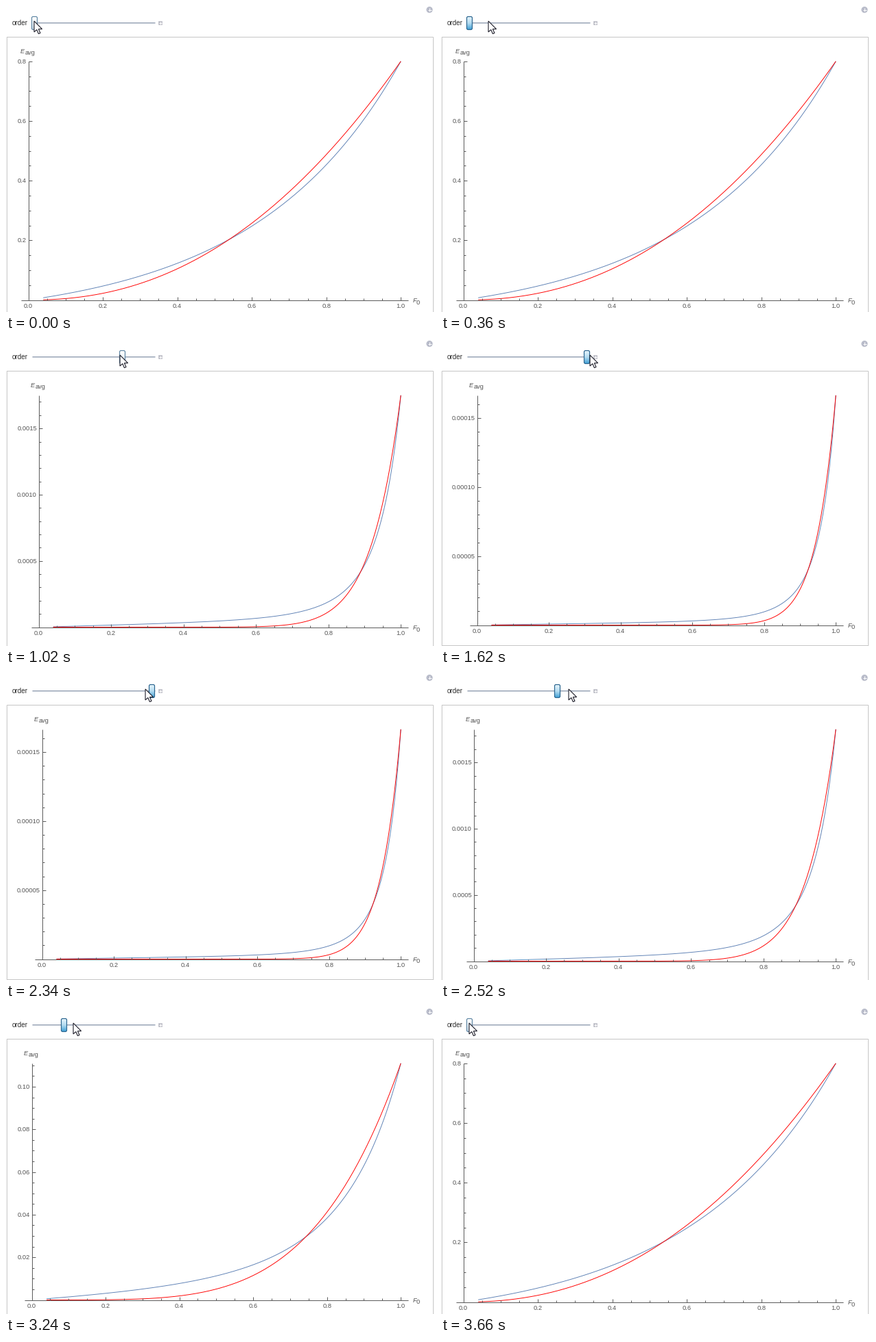
A matplotlib script for the animation above (3.84 s loop, 625 by 447 pixels).

```python
import math

import numpy as np
import matplotlib.pyplot as plt
from matplotlib.animation import FuncAnimation
from matplotlib.colors import to_rgb
from matplotlib.patches import Circle, FancyBboxPatch, Polygon, Rectangle

W, H, DPI = 625, 447, 64
FRAMES, STEP = 64, 60
PX = 72 / DPI  # points per pixel
RED, BLUE, AXIS, TEXT = "#ff0000", "#5e81b5", "#5c5c5c", "#555555"
RIGHT, TOP = 575.2, 80.8
PEAKS = [0.8, 0.111, 0.01505, 0.00175, 0.0001665]

plt.rcParams["font.family"] = "Liberation Sans"
fig = plt.figure(figsize=(W / DPI, H / DPI), dpi=DPI, facecolor="white")
ax = fig.add_axes([0, 0, 1, 1])
ax.axis("off")


def line(xs, ys, color=AXIS, width=1.0, z=3):
    return ax.plot(xs, ys, color=color, lw=width * PX, zorder=z,
                   solid_capstyle="butt")[0]


def label(x, y, s, ha="left", size=9.3, color=TEXT, **kw):
    return ax.text(x, y, s, ha=ha, va="baseline", fontsize=size * PX,
                   color=color, **kw)


def tick_step(peak):
    """Round 1-2-5 step, its minor divisions and its decimals."""
    rough = peak / 7.8
    power = math.floor(math.log10(rough))
    lead = next(m for m in (1, 2, 5, 10) if m * 10.0 ** power >= rough)
    return lead * 10.0 ** power, 5 if lead == 5 else 4, -power


def red_curve(f, n):
    return f ** (0.55 * n * n + 0.57 * n + 1.1)


def blue_curve(f, n):
    """Straight rise plus a part that climbs steeply near f = 1."""
    flat = 0.095 * (n - 1) * 0.38 ** (n - 2)
    bend = 0.1 * n * n + 0.65 * n - 0.3
    return f * (flat + (1 - flat) / (1 + bend * (1 - f)) ** 4)


def build_plot(n):
    peak = PEAKS[n - 1]
    left = 27.5 + 5 * n
    base = math.floor(432.5 - 3.2 * n) + 0.5
    width, height = RIGHT - left, base - TOP
    group = [ax.add_patch(Rectangle((0.5, 44.5), 621, base - 15.5, fill=False,
                                    ec="#c6c6c6", lw=PX))]

    f = np.linspace(0.04, 1, 400)
    for curve, color in ((blue_curve, BLUE), (red_curve, RED)):
        group.append(line(left + f * width, base - curve(f, n) * height,
                          color, 0.95, 2))

    group.append(line([left - 0.02 * width, RIGHT + 0.02 * width], [base, base]))
    group.append(line([left, left], [base, TOP]))

    for k in range(21):
        x = left + k * width / 20
        big = k % 4 == 0
        group.append(line([x, x], [base, base - (5 if big else 3)]))
        if big:
            group.append(label(x, base + 11.5, f"{k / 20:.1f}", "center"))

    major, parts, decimals = tick_step(peak)
    minor = major / parts
    for k in range(1, int(peak / minor + 1e-6) + 1):
        y = base - k * minor / peak * height
        big = k % parts == 0
        group.append(line([left, left + (5 if big else 3)], [y, y]))
        if big:
            group.append(label(left - 2.5, y + 3, f"{k * minor:.{decimals}f}", "right"))

    group.append(label(left - 11.5, 69, "E", style="italic"))
    group.append(label(left - 4.5, 71, "avg"))
    group.append(label(592.7, base + 3.3, "F", style="italic"))
    group.append(label(598, base + 6, "0"))
    return group


def plus(x, y, r):
    line([x - r, x + r], [y, y], "white", z=6)
    line([x, x], [y - r, y + r], "white", z=6)


plots = [build_plot(n) for n in range(1, 6)]

# slider row
label(8.6, 28.3, "order", size=9.9, color="#2a2a2a")
line([38, 217], [23.5, 23.5], "#98a3b5")
line([38, 217], [24.5, 24.5], "#c9d0da")
ax.add_patch(FancyBboxPatch((222.5, 22.5), 5, 5, fc="#c3c4cc", ec="none", zorder=5,
                            boxstyle="round,pad=0.5,rounding_size=1"))
plus(225, 25, 2)
ax.add_patch(Circle((617, 5.5), 4.6, fc="#b9bcca", ec="none", zorder=5))
plus(617, 5.5, 2.5)

# thumb looks: edge, then fill from top to bottom
PALE = ("#5f86a4", "#ffffff", "#e9f1f6", "#cbdce8")
LIT = ("#2b658f", "#e3f3fb", "#b4dcf1", "#4aa5d8")


def gradient(colors):
    rgb = np.array([to_rgb(c) for c in colors])
    t = np.linspace(0, len(rgb) - 1, 18)
    return np.stack([np.interp(t, range(len(rgb)), ch) for ch in rgb.T], -1)[:, None]


fills = {look: gradient(look[1:]) for look in (PALE, LIT)}
fill = ax.imshow(fills[LIT], extent=(38, 46, 34, 16), aspect="auto",
                 interpolation="nearest", zorder=7)
thumb = ax.add_patch(FancyBboxPatch((0, 16.5), 6, 17, fill=False, lw=1.2 * PX,
                                    boxstyle="round,pad=1,rounding_size=2", zorder=8))

ARROW = np.array([(0, 0), (0, 16), (3.8, 12.6), (6.4, 18.6), (9, 17.5),
                  (6.4, 11.7), (11.6, 11.7)])
arrow = ax.add_patch(Polygon(ARROW, fc="white", ec="#1c1c28", lw=1.1 * PX,
                             joinstyle="miter", zorder=10))

# pointer path: time in ms, x
PATH = [(120, 41), (720, 110), (1020, 166), (1620, 217),
        (2220, 215), (2820, 156), (3660, 41)]

ax.set_xlim(0, W)
ax.set_ylim(H, 0)


def update(i):
    x = round(np.interp(i * STEP, *zip(*PATH)))
    n = int(np.clip((x - 42) / 42.75 + 0.25, 0, 4))
    for k, group in enumerate(plots):
        for artist in group:
            artist.set_visible(k == n)
    center = round(42.4 + 42.6 * n) - 0.5
    look = PALE if abs(x - center + 2) < 4 else LIT
    fill.set_data(fills[look])
    fill.set_extent((center - 3.5, center + 3.5, 34, 16))
    thumb.set_x(center - 3)
    thumb.set_edgecolor(look[0])
    arrow.set_xy(ARROW + (x, 22))
    return []


anim = FuncAnimation(fig, update, frames=FRAMES, interval=STEP, repeat=True,
                     repeat_delay=0, blit=False)
plt.show()
```
